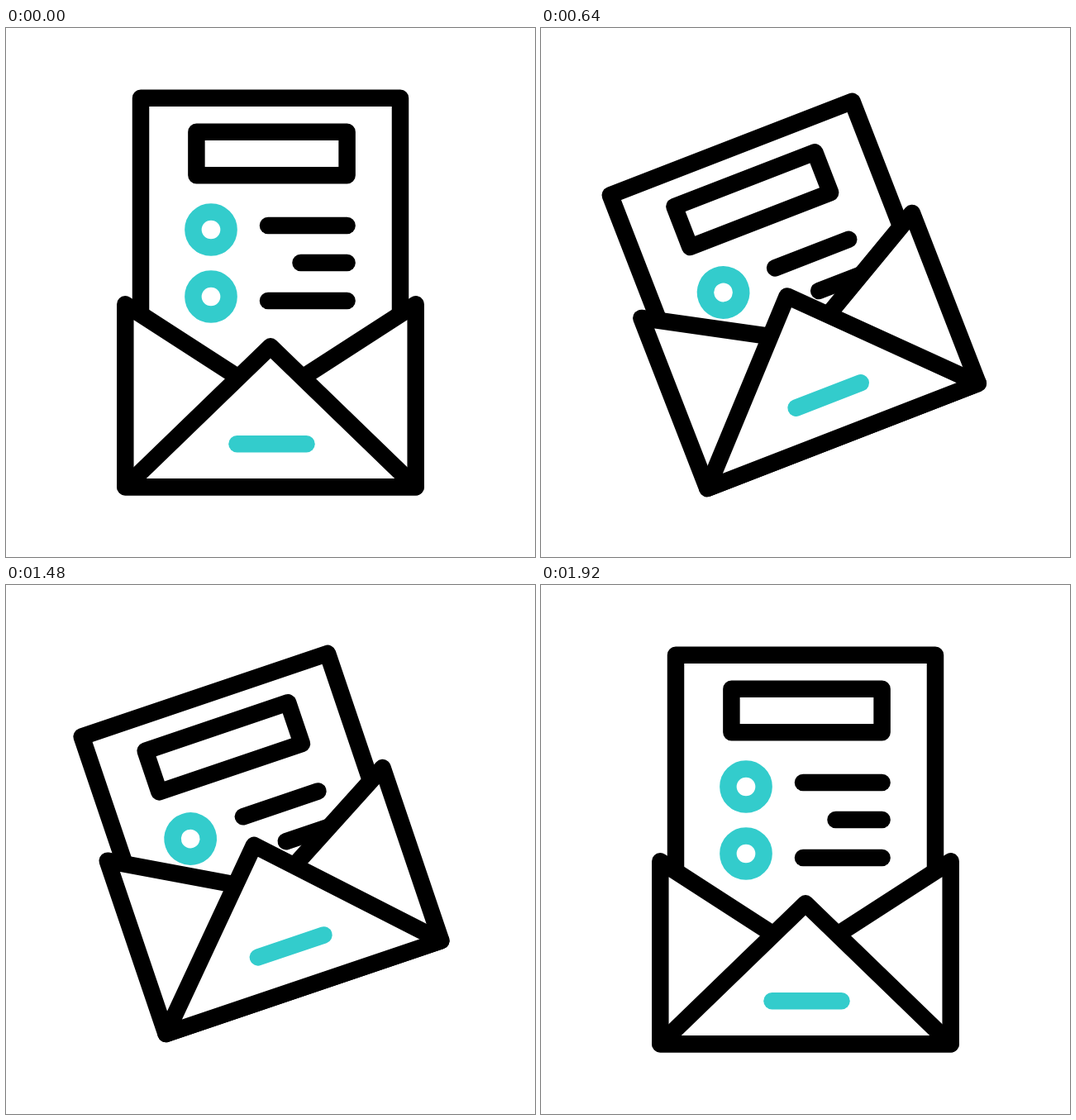
Write an HTML page with a canvas that moves like this. It is 640 by 640 pixels and loops after 2000 ms.

```html
<!DOCTYPE html>
<html lang="en">
<head>
<meta charset="utf-8">
<title>Letter in envelope</title>
<style>
html, body { margin: 0; width: 100%; height: 100%; overflow: hidden; background: #fff; }
canvas { display: block; }
</style>
</head>
<body>
<canvas id="stage" width="640" height="640"></canvas>
<script>
const ctx = document.getElementById('stage').getContext('2d');
const LOOP = 2000, STEP = 40;
const BLACK = '#000', TEAL = '#33cccc';

// Each track is a list of time, value pairs, eased from one to the next.
const TRACKS = {
  angle:   [120, 0, 640, -21.2, 1360, -21.2, 1920, 0],
  drift:   [120, 0, 270, -1.8, 450, 2.8, 640, 0.6, 1360, 0.6, 1920, 0],
  lift:    [120, 0, 400, 13, 640, -53.5, 1360, -53.5, 1660, -78, 1920, 0],
  sink:    [120, 0, 412, 160, 640, 97.3, 1500, 97.3, 1920, 0],
  flap:    [120, 0, 440, 40.5, 640, -12, 1500, -12, 1920, 0],
  lag:     [140, 0, 440, 45, 640, 0],
  boxHead: [700, 0, 1300, 1],
  boxTail: [1055, 0, 1415, 1],
  rimHead: [640, 0.05, 960, 0.91],
  rimTail: [800, 0.05, 1160, 0.91]
};

function valueAt(keys, t) {
  if (t <= keys[0]) return keys[1];
  for (let i = 2; i < keys.length; i += 2) {
    const [t0, v0, t1, v1] = keys.slice(i - 2, i + 2);
    if (t <= t1) {
      const p = (t - t0) / (t1 - t0);
      return v0 + (v1 - v0) * p * p * (3 - 2 * p);
    }
  }
  return keys[keys.length - 1];
}

function trace(points, closed) {
  ctx.beginPath();
  points.forEach(([x, y]) => ctx.lineTo(x, y));
  if (closed) ctx.closePath();
}

function line(points, color = BLACK, closed = false, fill = false) {
  trace(points, closed);
  if (fill) {
    ctx.fillStyle = '#fff';
    ctx.fill();
  }
  ctx.strokeStyle = color;
  ctx.stroke();
}

// Strokes only the part of a path between two fractions of its length.
function sweep(points, tail, head) {
  if (head - tail < 0.001) return;
  let length = 0;
  for (let i = 1; i < points.length; i++) {
    length += Math.hypot(points[i][0] - points[i - 1][0], points[i][1] - points[i - 1][1]);
  }
  ctx.setLineDash([(head - tail) * length, length * 2]);
  ctx.lineDashOffset = -tail * length;
  line(points, TEAL);
  ctx.setLineDash([]);
}

function ring(x, y) {
  ctx.beginPath();
  ctx.arc(x, y, 21.6, 0, Math.PI * 2);
  ctx.strokeStyle = TEAL;
  ctx.stroke();
}

function drawLetter(s) {
  const top = s.sink - 470.5;
  line([[-157, -180], [-157, top], [157, top], [157, -180]]);

  const y = top + 41 + s.lag * 0.89;
  const box = [[92.6, y + 52.4], [92.6, y], [-89.6, y], [-89.6, y + 52.4], [92.6, y + 52.4]];
  line(box, BLACK, true);
  sweep(box, s.boxTail, s.boxHead);

  // Lower rows trail behind the sheet a little less.
  const row = (d, i) => top + d + s.lag * (1.01 - 0.145 * i);
  ring(-72, row(159.2, 0));
  ring(-72, row(240.2, 2));
  [[-3, 154.2], [36.5, 199.2], [-3, 245.2]].forEach(([x, d], i) => {
    line([[x, row(d, i)], [92.6, row(d, i)]]);
  });
}

function drawEnvelope(s) {
  const left = [-175.7, 0], right = [175.7, 0];
  const apex = [s.flap * 0.145, s.flap - 170];
  const valley = [0, s.flap * 1.25 - 107.5];
  line([[-175.7, -221], valley, [175.7, -221], right, left], BLACK, true, true);
  line([left, apex, right], BLACK, true, true);
  sweep([right, apex, left], s.rimTail, s.rimHead);
  line([[-40.5, -52], [43.5, -52]], TEAL);
}

function draw(now) {
  const t = Math.floor(now % LOOP / STEP) * STEP;
  const s = {};
  for (const name in TRACKS) s[name] = valueAt(TRACKS[name], t);

  ctx.fillStyle = '#fff';
  ctx.fillRect(0, 0, 640, 640);
  ctx.save();
  ctx.lineWidth = 20.5;
  ctx.lineCap = ctx.lineJoin = 'round';
  ctx.translate(320 + s.drift, 432.3 + s.lift);
  ctx.rotate(s.angle * Math.PI / 180);
  ctx.translate(0, 123); // the origin is now the middle of the envelope's base
  drawLetter(s);
  drawEnvelope(s);
  ctx.restore();
  requestAnimationFrame(draw);
}
requestAnimationFrame(draw);
</script>
</body>
</html>
```
